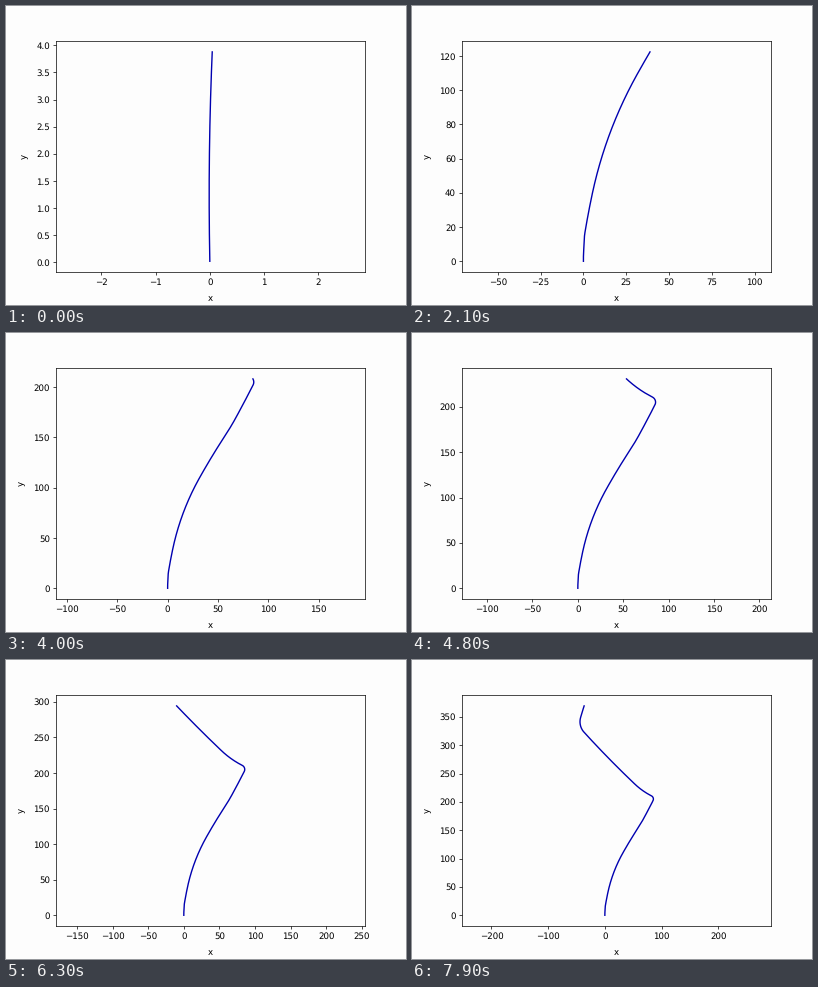
Animation, 400 px wide and 299 px high, one loop 8000 ms. Source, as a matplotlib script:

```python
import numpy as np
import matplotlib.pyplot as plt
from matplotlib.animation import FuncAnimation

FRAMES, INTERVAL, DPI = 80, 100, 62.5
PAPER, BLUE = "#fdfdfd", "#0000b0"
STRIDE = .02

# Steering: distance travelled, heading in radians right of straight up
TURNS = [(0, -.02), (4, .045), (13, .05), (17, .165), (40, .21), (115, .51),
         (165, .58), (185, .5), (222, .47), (232, -1.1), (268, -.81),
         (396, -.74), (424, .28), (450, .32)]


def route():
    dist = np.arange(0, 450, STRIDE)
    heading = np.interp(dist, *zip(*TURNS))
    return np.cumsum(np.sin(heading)) * STRIDE, np.cumsum(np.cos(heading)) * STRIDE


def travelled():
    """Distance at each step: steady cruise, braking in the two bends."""
    def brake(t, centre, depth):
        return depth * np.exp(-((t - centre) / 3.6) ** 2)

    t = np.arange(FRAMES - 1) + .5
    speed = 6 - brake(t, 39.2, 3.9) - brake(t, 72, 1.2)
    return 3.88 + np.concatenate(([0], np.cumsum(speed)))


X, Y = route()
DIST = travelled()

plt.rcParams["text.hinting"] = "none"
fig, ax = plt.subplots(figsize=(400.001 / DPI, 299.001 / DPI), dpi=DPI,
                       facecolor=PAPER)
fig.subplots_adjust(left=.125, right=.8985, bottom=.1112, top=.8815)
ax.set_facecolor(PAPER)
ax.set_xlabel("x", labelpad=8.5)
ax.set_ylabel("y", labelpad=8.5)
line, = ax.plot([], [], color=BLUE, lw=1.6)
box = ax.get_window_extent()
RATIO = box.width / box.height


def draw(step):
    n = int(DIST[step] / STRIDE)
    x, y = X[:n], Y[:n]
    line.set_data(x, y)
    mid_x, mid_y = (x.min() + x.max()) / 2, (y.min() + y.max()) / 2
    half = .55 * np.ptp(y)
    ax.set_ylim(mid_y - half, mid_y + half)
    ax.set_xlim(mid_x - half * RATIO, mid_x + half * RATIO)
    return line,


anim = FuncAnimation(fig, draw, frames=FRAMES, interval=INTERVAL,
                     repeat=True, repeat_delay=0, blit=False)
plt.show()
```
